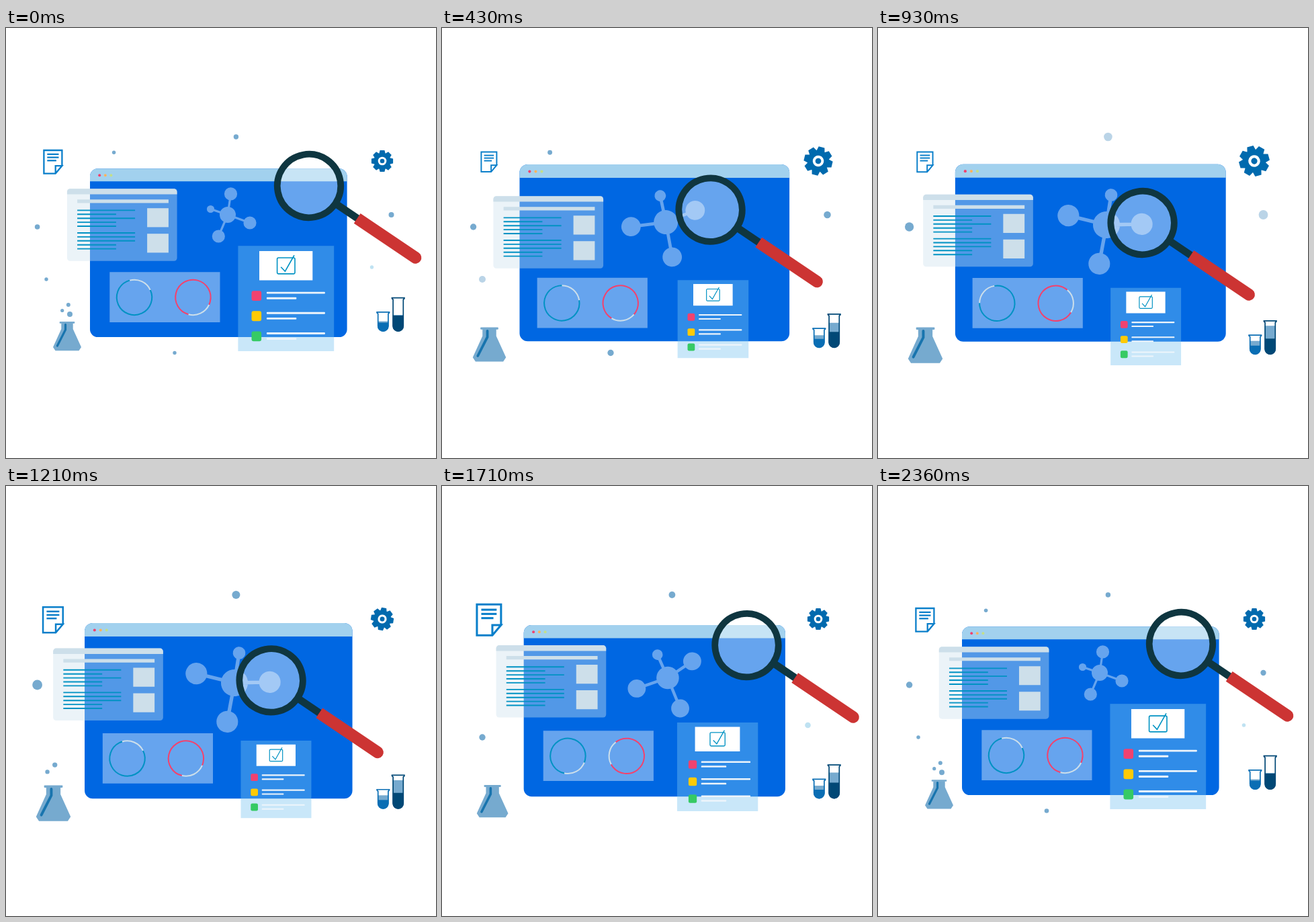
An HTML page with a canvas that plays this animation: 640x640 px, repeating every 2.43 s.

```html
<!DOCTYPE html>
<html lang="en">
<head>
<meta charset="utf-8">
<title>Research window</title>
<style>
html, body { margin: 0; width: 100%; height: 100%; overflow: hidden; background: #fff; }
canvas { display: block; width: 100vw; height: 100vh; }
</style>
</head>
<body>
<canvas id="stage" width="640" height="640"></canvas>
<script>
const ctx = document.getElementById('stage').getContext('2d');
const LOOP = 2430, STEPS = 34;
const NAVY = '#0f3640', MIST = '#cddfea', STEEL = '#76aacf', TEAL = '#0092c3';
const ROSE = '#f1426f', GLASS = 'rgba(255,255,255,.4)';
let now = 0; // current step of the loop

// Eased 0 to 1 between steps a and b
function ramp(a, b) {
  const u = Math.min(1, Math.max(0, (now - a) / (b - a)));
  return u * u * (3 - 2 * u);
}

// Up from a to b, hold, back down from c to d
const swing = (a, b, c, d) => ramp(a, b) - ramp(c, d);
const rad = a => a * Math.PI / 180;

function group(x, y, scale, turn, draw) {
  ctx.save();
  ctx.translate(x, y);
  ctx.scale(scale, scale);
  ctx.rotate(rad(turn));
  draw();
  ctx.restore();
}

function box(x, y, w, h, color, r = 0) {
  ctx.fillStyle = color;
  ctx.beginPath();
  ctx.roundRect(x, y, w, h, r);
  ctx.fill();
}

function disc(x, y, r, color, alpha = 1) {
  ctx.globalAlpha = Math.min(1, Math.max(0, alpha));
  ctx.fillStyle = color;
  ctx.beginPath();
  ctx.arc(x, y, r, 0, 7);
  ctx.fill();
  ctx.globalAlpha = 1;
}

function arc(x, y, r, from, to, color, width) {
  ctx.strokeStyle = color;
  ctx.lineWidth = width;
  ctx.beginPath();
  ctx.arc(x, y, r, rad(from), rad(to));
  ctx.stroke();
}

function line(color, width, ...p) {
  ctx.strokeStyle = color;
  ctx.lineWidth = width;
  ctx.beginPath();
  for (let i = 0; i < p.length; i += 2) ctx.lineTo(p[i], p[i + 1]);
  ctx.stroke();
}

function poly(color, ...p) {
  ctx.fillStyle = color;
  ctx.beginPath();
  for (let i = 0; i < p.length; i += 2) ctx.lineTo(p[i], p[i + 1]);
  ctx.fill();
}

// Grows until it fades out at step off, returns at step on and shrinks
function dot(x, y, small, big, off, on, color = STEEL) {
  const r = small + (big - small) * swing(0, off, on, STEPS);
  disc(x, y, r, color, 1 - swing(off - 1, off + 1, on - 1, on + 1));
}

function dots() {
  dot(46.6, 296, 3.8, 7.5, 19, 31);
  dot(342.4, 162, 3.7, 6.3, 4, 13);
  dot(160.6, 185.3, 2.7, 4.2, 12, 27);
  dot(60, 374, 2.7, 5, 6, 21);
  dot(573.5, 278, 4, 6.9, 13, 27);
  dot(251, 483.5, 2.7, 5, 8, 31);
  dot(544.5, 356, 2.7, 4.6, 4, 21, '#bfe2f2');
}

function browser() {
  box(-191.3, -125.4, 382.6, 250.8, '#0067e2', 11.5);
  box(-191.3, -125.4, 382.6, 19, '#a2d1ee', [11.5, 11.5, 0, 0]);
  [ROSE, '#ffb45e', '#c3df8a'].forEach((c, i) => disc(-177.1 + i * 8.6, -115.4, 2, c));
}

function page() {
  box(0, 0, 163.7, 107.5, 'rgba(205,225,238,.4)', 4.5);
  box(0, 0, 163.7, 8.3, MIST, [4.5, 4.5, 0, 0]);
  box(15.2, 16, 135.8, 5.2, MIST);
  for (const top of [29, 67]) box(119.2, top, 31.8, 28.2, MIST);
  ['LSLSS', 'LLLSS'].forEach((rows, n) => [...rows].forEach((size, i) =>
    line(TEAL, 1.9, 15.2, 32.2 + n * 33.6 + i * 5.9, size === 'L' ? 101.2 : 73,
      32.2 + n * 33.6 + i * 5.9)));
}

function charts() {
  const turn = 360 * swing(4.5, 16.5, 16.5, 29);
  box(0, 0, 164.2, 74.8, GLASS);
  [[36.7, -105, TEAL], [124.1, 25, '#f4416c']].forEach(([x, a, color]) => {
    const start = a + turn;
    arc(x, 37.7, 26.2, start + 80, start + 360, color, 2);
    arc(x, 37.7, 26.2, start, start + 80, MIST, 2);
  });
}

function molecule() {
  const nodes = [[-25.5, -8.5, 5.6], [4.5, -31.1, 9.6], [33, 12, 9.6], [-13.7, 32, 9.6]];
  ctx.fillStyle = GLASS;
  ctx.beginPath();
  const add = (x, y, r) => { ctx.moveTo(x + r, y); ctx.arc(x, y, r, 0, 2 * Math.PI); };
  add(0, 0, 12);
  for (const [x, y, r] of nodes) {
    add(x, y, r);
    const d = Math.hypot(x, y), nx = -y / d * 1.6, ny = x / d * 1.6;
    ctx.moveTo(nx, ny);
    ctx.lineTo(-nx, -ny);
    ctx.lineTo(x - nx, y - ny);
    ctx.lineTo(x + nx, y + ny);
    ctx.closePath();
  }
  ctx.fill();
}

// Origin at the middle of the panel
function checklist() {
  ctx.translate(-71.4, -78.35);
  box(0, 0, 142.8, 156.7, 'rgba(120,195,240,.4)');
  box(31.6, 7.8, 79.3, 43.4, '#fff');
  ctx.strokeStyle = TEAL;
  ctx.lineWidth = 1.6;
  ctx.beginPath();
  ctx.roundRect(58.2, 17.8, 26.4, 23.8, 2);
  ctx.stroke();
  line(TEAL, 1.6, 63.8, 31.5, 70, 38, 83.6, 14);
  [ROSE, '#ffca05', '#36ca64'].forEach((c, i) => {
    const y = 66.9 + i * 30.2;
    box(20.1, y, 14.6, 14.8, c, 3);
    box(42.5, y + 1.5, 87, 2.9, '#eef5fb', 1);
    box(42.5, y + 9.6, 44.4, 2.9, '#eef5fb', 1);
  });
}

function magnifier() {
  disc(0, 0, 43, GLASS);
  line(NAVY, 11, 50, -.2, 88, -.2);
  arc(0, 0, 47.2, 0, 360, NAVY, 9.7);
  box(86.5, -8.8, 113.5, 17.6, '#cc3433', [0, 8.8, 8.8, 0]);
}

function gear() {
  disc(0, 0, 12.3, '#006aae');
  for (let i = 0; i < 8; i++) {
    poly('#006aae', -4.7, -11, -3.4, -16.1, 3.4, -16.1, 4.7, -11);
    ctx.rotate(Math.PI / 4);
  }
  disc(0, 0, 6.3, '#fff');
  disc(0, 0, 3.3, '#006aae');
}

function note() {
  const c = '#0a7fca';
  line(c, 2.3, 13.5, 5.8, 13.5, -17.3, -13.5, -17.3, -13.5, 17.3, 3.8, 17.3,
    13.5, 5.8, 3.8, 5.8, 3.8, 17.3);
  [8.6, 8.6, 5].forEach((end, i) => line(c, 2.3, -8.6, -11.4 + i * 4.7, end, -11.4 + i * 4.7));
}

// Shown at the loop's ends and once more around step peak
function bubble(x, y, r, peak, on) {
  const alpha = 1 - swing(1, 5, on, 32) + swing(peak - 3, peak, peak, peak + 3);
  disc(x, y, r, STEEL, alpha);
}

function flask() {
  box(-11.3, 0, 22.6, 2.7, STEEL, .8);
  poly(STEEL, -8.7, 2, -8.7, 11, -21, 38, -17.5, 43.3, 17.5, 43.3, 21, 38, 8.7, 11, 8.7, 2);
  ctx.lineCap = 'round';
  line('#1874ae', 3.2, -2.5, 4.4, -2.5, 12.2, -14.6, 36);
  bubble(4, -10.9, 4, 10, 26);
  bubble(-7.3, -16.5, 2.6, 17, 29);
  bubble(1.8, -24.9, 3, 17, 28);
}

// Origin at the middle of the tube's foot
function tube(height, level, foam, color) {
  box(-8.2, -level - foam, 16.4, foam + .5, STEEL);
  box(-8.2, -level, 16.4, level, color, [0, 0, 8.2, 8.2]);
  ctx.strokeStyle = color;
  ctx.lineWidth = 1.7;
  ctx.lineJoin = 'round';
  ctx.beginPath();
  ctx.moveTo(-9.4, -height + .9);
  ctx.quadraticCurveTo(-9.2, -height + 3, -7.6, -height + 3.2);
  ctx.lineTo(-7.6, -8.7);
  ctx.arc(0, -8.5, 7.6, Math.PI, 0, true);
  ctx.lineTo(7.6, -height + 3.2);
  ctx.quadraticCurveTo(9.2, -height + 3, 9.4, -height + .9);
  ctx.closePath();
  ctx.stroke();
}

function draw() {
  ctx.fillStyle = '#fff';
  ctx.fillRect(0, 0, 640, 640);
  dots();

  group(316.3, 334.7, 1 + .059 * swing(0, 8, 8, 33), 0, browser);

  const lift = 3 * swing(17, 28, 28, 33.5);
  group(90.9 - 23.9 * swing(0, 10.5, 12, 34), 239.2 + 11 * swing(0, 6, 10, 20) - lift,
    1, 0, page);

  const settle = Math.min(1, (STEPS - now) / 24) ** 3;
  group(154.3 - 15 * swing(0, 8, 9, 31), 363.2 + 13.2 * ramp(0, 10) * settle, 1, 0, charts);

  const grow = swing(0, 9, 17, 33);
  group(330 + 10 * swing(3, 11, 17, 33), 278 + 15 * swing(0, 9, 17, 31),
    1 + .675 * grow, 80.5 * grow, molecule);

  const slide = swing(0, 9.5, 9.5, 33.5);
  group(416.8 - 19.3 * slide, 402.6 + 44.3 * slide,
    1 - .265 * swing(0, 6.5, 17, 33), 0, checklist);

  const overshoot = 2.5 * swing(20, 24, 24, 28);
  group(451 - 57.4 * swing(0, 7.5, 16.5, 23) + overshoot,
    235 + 55 * swing(0, 10, 16.5, 25), 1, 34, magnifier);

  const spin = swing(0, 10.5, 10.5, 18.5);
  group(560, 198, 1 + .52 * spin, 97 * spin, gear);

  group(69.9, 199.3, 1 - .23 * swing(0, 10, 10, 17) + .33 * swing(13, 24, 24, 33), 0, note);

  group(91 - 20.5 * swing(0, 6, 20, 33), 437 + 8.6 * swing(0, 6, 22, 34),
    1 + .225 * swing(0, 8.5, 17, 31), 0, flask);

  const foot = 452 + 35 * swing(0, 9.5, 11, 33.5), foam = swing(0, 9.5, 20, 33);
  group(561.3, foot, 1, 0, () => tube(30, 13.5, 2 + 5 * foam, '#0a6eb4'));
  group(583.7, foot, 1, 0, () => tube(51.3, 24, 1 + 18 * foam, '#004876'));
}

const start = performance.now();
function tick() {
  const t = (performance.now() - start) % LOOP;
  now = Math.floor((t + 5.5) * STEPS / LOOP) % STEPS;
  draw();
  requestAnimationFrame(tick);
}
tick();
</script>
</body>
</html>
```
